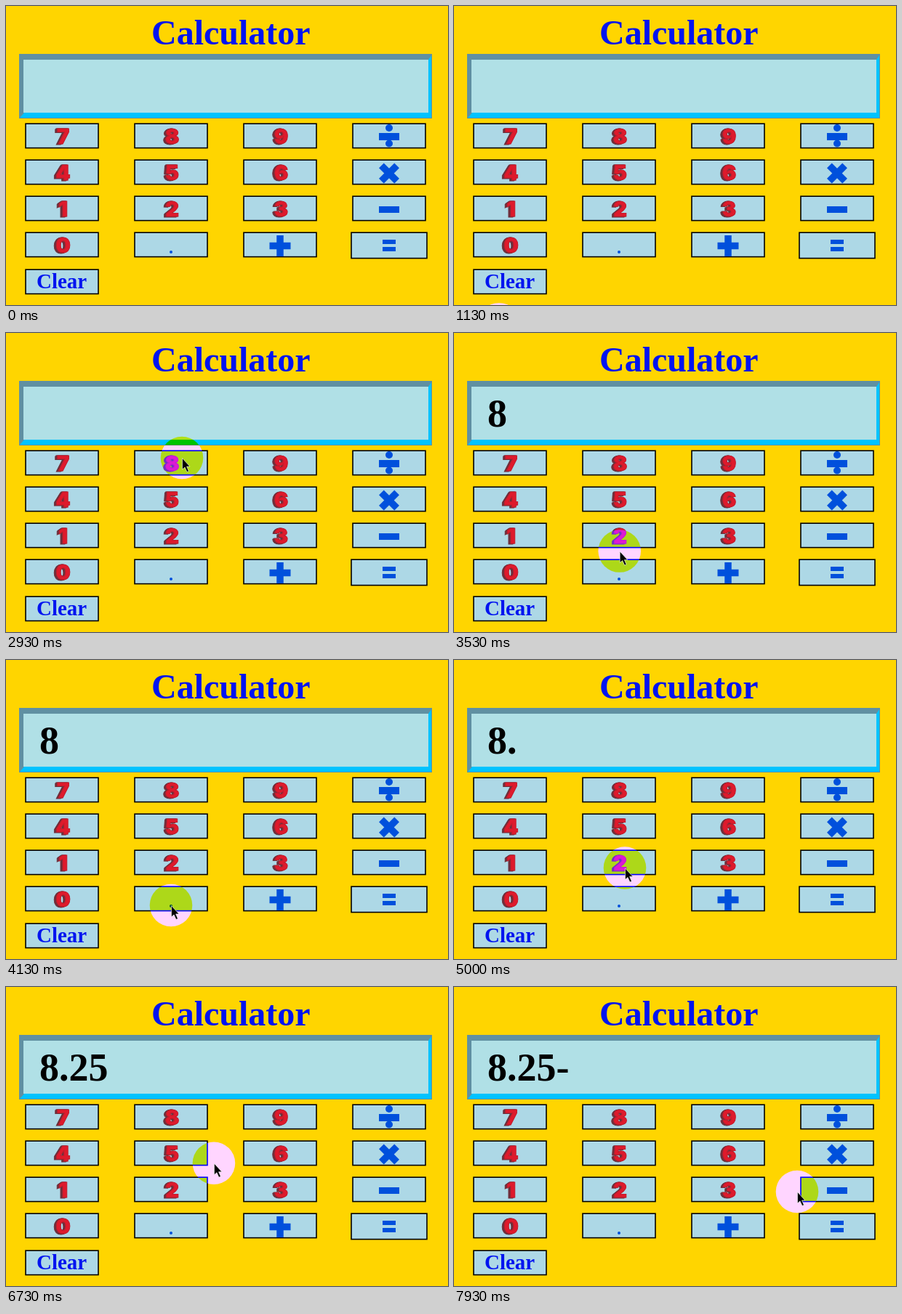
An HTML page for the animation above (8 s loop, 608 px wide and 412 px high).

```html
<!DOCTYPE html>
<html lang="en">
<head>
<meta charset="utf-8">
<title>Calculator</title>
<style>
  html, body { margin: 0; width: 100%; height: 100%; overflow: hidden; background: #ffd500; }
  svg { display: block; width: 608px; height: 412px; isolation: isolate; }
  .serif { font-family: "Liberation Serif", "Times New Roman", serif; font-weight: 700; fill: #0014f0; }
  #readout { font-size: 54px; fill: #000; }
  .key { fill: #add8e6; stroke: #000; stroke-width: 1.6; }
  .digit { font: 900 29px Inter, "Open Sans", sans-serif; text-anchor: middle; }
  .side { fill: #70303c; stroke: #70303c; }
  .face { fill: #de1a2c; stroke: #c41c2c; }
  .sign { fill: #0050dc; }
  /* Inverts only the blue channel below it */
  #halo { fill: #00f; mix-blend-mode: difference; }
  #arrow { fill: #000; stroke: #fff; stroke-width: .6; }
</style>
</head>
<body>
<svg viewBox="0 0 608 412">
  <rect width="608" height="412" fill="#ffd500"/>
  <text class="serif" x="200" y="53" font-size="48">Calculator</text>
  <rect x="18" y="66" width="568" height="89" fill="#6090a2"/>
  <path d="M585 68V154H19L25 147H581V74Z" fill="#00c3ff"/>
  <rect x="24" y="74" width="557" height="73" fill="#b0e0e6"/>
  <text class="serif" id="readout" x="46" y="128.5"></text>
  <g id="keys"></g>
  <text class="serif" x="42" y="389" font-size="29">Clear</text>
  <circle id="halo" r="29.3"/>
  <path id="arrow" d="M.5 .5V16L4 13L7 19.5L9.4 18.4L6.6 12H11Z"/>
</svg>
<script>
  const LOOP = 8000, PRESS_DELAY = 400;
  const labels = ["789÷", "456×", "123-", "0.+=", "C"];

  // Signs are drawn around the centre of their key
  const bar = (w, h, y = 0) => `<rect x="${-w / 2}" y="${y - h / 2}" width="${w}" height="${h}"/>`;
  const dot = (r, y) => `<circle r="${r}" cy="${y}"/>`;
  const cross = (size, turn) =>
    `<g transform="translate(0 1.5) rotate(${turn})">${bar(size, 9.5) + bar(9.5, size)}</g>`;
  const signs = {
    "÷": dot(5, -11) + bar(28, 10, 1) + dot(5, 10.5),
    "×": cross(30, 45),
    "-": bar(28, 9, 1.5),
    "+": cross(29, 0),
    "=": bar(18, 6, -4) + bar(18, 6, 6),
    ".": dot(2, 10)
  };

  // A dark extrusion to the left of a red face
  const digit = d => [3, 2, 1, 0].map(depth =>
    `<text class="digit ${depth ? "side" : "face"}" x="${1.5 - depth}" y="${11 + depth * .2}">${d}</text>`
  ).join("");

  function key(label, row, col) {
    const x = 26 + 150 * col, y = 161 + Math.floor(50.3 * row);
    const grow = label === "=" ? 2 : 0;
    const mark = /\d/.test(label) ? digit(label) : signs[label] || "";
    return `<rect class="key" x="${x + 1 - grow}" y="${y + 1.2}"
      width="${100 + 2 * grow}" height="${33.4 + grow}"/>
      <g class="sign" transform="translate(${x + 51} ${y + 18})">${mark}</g>`;
  }

  document.getElementById("keys").innerHTML = labels
    .map((line, row) => [...line].map((label, col) => key(label, row, col)).join(""))
    .join("");

  // Pointer moves: departure, arrival, x, y and the key pressed there
  const start = [59, 450];
  const moves = [
    [930, 1730, 78, 376, ""],
    [2300, 2800, 242, 172, "8"],
    [3200, 3730, 221, 361, ""],
    [3730, 4000, 227, 338, "."],
    [4400, 5000, 235, 286.5, "2"],
    [5400, 5930, 239, 237.5, "5"],
    [6570, 7200, 531, 270, "-"],
    [7600, 7930, 472, 282, ""]
  ];

  const smooth = k => k * k * (3 - 2 * k);
  const progress = (t, from, to) => smooth(Math.min(1, Math.max(0, (t - from) / (to - from))));

  function pointer(t) {
    return moves.reduce(([x, y], [from, to, toX, toY]) => {
      const k = progress(t, from, to);
      return [x + (toX - x) * k, y + (toY - y) * k];
    }, start);
  }

  const typed = t => moves
    .filter(([, arrival]) => arrival + PRESS_DELAY <= t)
    .map(move => move[4])
    .join("");

  const halo = document.getElementById("halo");
  const arrow = document.getElementById("arrow");
  const readout = document.getElementById("readout");

  function draw() {
    const now = performance.now() % LOOP;
    // The picture advances in alternating 130 ms and 70 ms steps
    const t = now - now % 200 + (now % 200 >= 130 ? 130 : 0);
    const place = `translate(${pointer(t).join(" ")})`;
    halo.setAttribute("transform", place);
    arrow.setAttribute("transform", place);
    readout.textContent = typed(t);
    requestAnimationFrame(draw);
  }
  draw();
</script>
</body>
</html>
```
